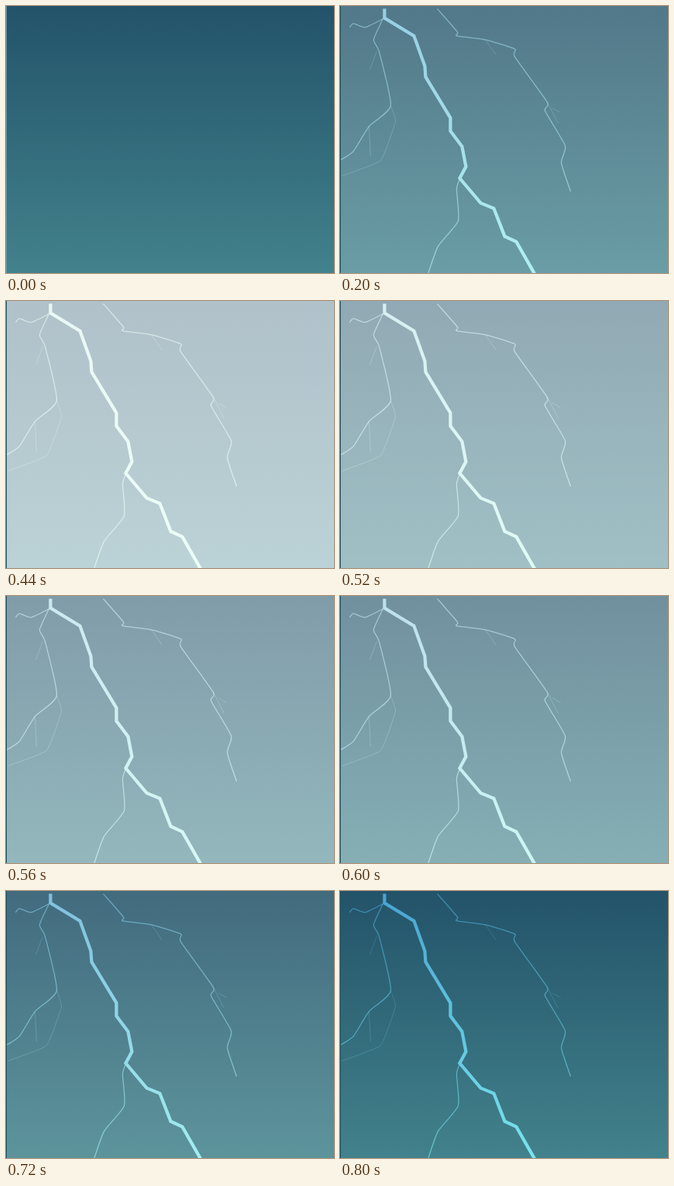
Recreate the animation shown at these times as an HTML page with a canvas. Size 423 by 345 pixels, loop 0.88 s.

```html
<!DOCTYPE html>
<html lang="en">
<head>
<meta charset="utf-8">
<title>Lightning</title>
<style>
  html, body { margin: 0; width: 100%; height: 100%; overflow: hidden; background: #235369; }
  canvas { display: block; }
</style>
</head>
<body>
<canvas id="sky" width="423" height="345"></canvas>
<script>
const W = 423, H = 345, LOOP = 880, STEP = 40;
const START = 40, RESTRIKE = 440, FADE = 0.00178;
const WHITE = [255, 255, 255], HOT = [246, 255, 248];
const ctx = document.getElementById('sky').getContext('2d');

// Smooth curve through key points; bend 0 keeps the corners sharp
function trace(points, bend) {
  const path = new Path2D();
  const p = points.split(' ').map(s => s.split(',').map(Number));
  const at = i => p[Math.max(0, Math.min(p.length - 1, i))];
  const handle = (i, sign) => at(i).map((v, k) => v + sign * bend * (at(i + 1)[k] - at(i - 1)[k]));
  path.moveTo(...p[0]);
  for (let i = 1; i < p.length; i++) {
    path.bezierCurveTo(...handle(i - 1, 1), ...handle(i, -1), ...p[i]);
  }
  return path;
}

const main = trace('57,3 57,15 95,38 109,77 110,91 142,144 142,161 157,181 162,207 154,222 181,254 198,261 212,297 227,304 252,348', 0);

const branches = [
  '55,16 43,43 50,58 65,128 37,155 17,187 1,198',
  '55,16 32,27 17,22 12,27',
  '125,3 151,33 150,38 187,43 225,55 225,65 267,124 264,135 290,180 285,202 297,239',
  '154,223 150,236 152,277 126,310 113,346'
].map(s => trace(s, 0.09));

const twigs = [
  '47,58 38,82',
  '37,155 39,194',
  '65,128 71,149 52,199 2,219',
  '187,43 201,63',
  '267,124 281,151',
  '273,131 284,137'
].map(s => trace(s, 0.06));

const mix = (a, b, k) => `rgb(${a.map((c, i) => Math.round(c + (b[i] - c) * k))})`;

function gradient(top, bottom, to, k) {
  const g = ctx.createLinearGradient(0, 0, 0, H);
  g.addColorStop(0, mix(top, to, k));
  g.addColorStop(1, mix(bottom, to, k));
  return g;
}

// Two flashes, each fading in a straight line
function flashAt(t) {
  if (t < START) return 0;
  const end = t < RESTRIKE ? 320 : 800;
  return Math.max(0, (end - t) * FADE);
}

function stroke(path, width, alpha) {
  ctx.lineWidth = width;
  ctx.globalAlpha = alpha;
  ctx.stroke(path);
  ctx.globalAlpha = 1;
}

function draw(t) {
  const flash = flashAt(t), lit = t >= START;
  ctx.fillStyle = gradient([35, 83, 105], [66, 130, 140], WHITE, flash);
  ctx.fillRect(0, 0, W, H);

  if (lit) {
    const glow = 1 - (1 - flash) ** 2.5;
    ctx.strokeStyle = gradient([72, 163, 210], [122, 228, 236], HOT, glow);
    ctx.save();
    ctx.translate(0.4, 0.6);
    twigs.forEach(p => stroke(p, 1, 0.28));
    branches.forEach(p => stroke(p, 1.3, 0.65));
    stroke(main, 4.2, 1);
    ctx.restore();
  }

  ctx.fillStyle = lit ? '#17505e' : '#6b95a5';
  ctx.fillRect(0, 0, 1, H);
}

let last = -1;
function tick() {
  const t = Math.floor(performance.now() % LOOP / STEP) * STEP;
  if (t !== last) draw(last = t);
  requestAnimationFrame(tick);
}
tick();
</script>
</body>
</html>
```
